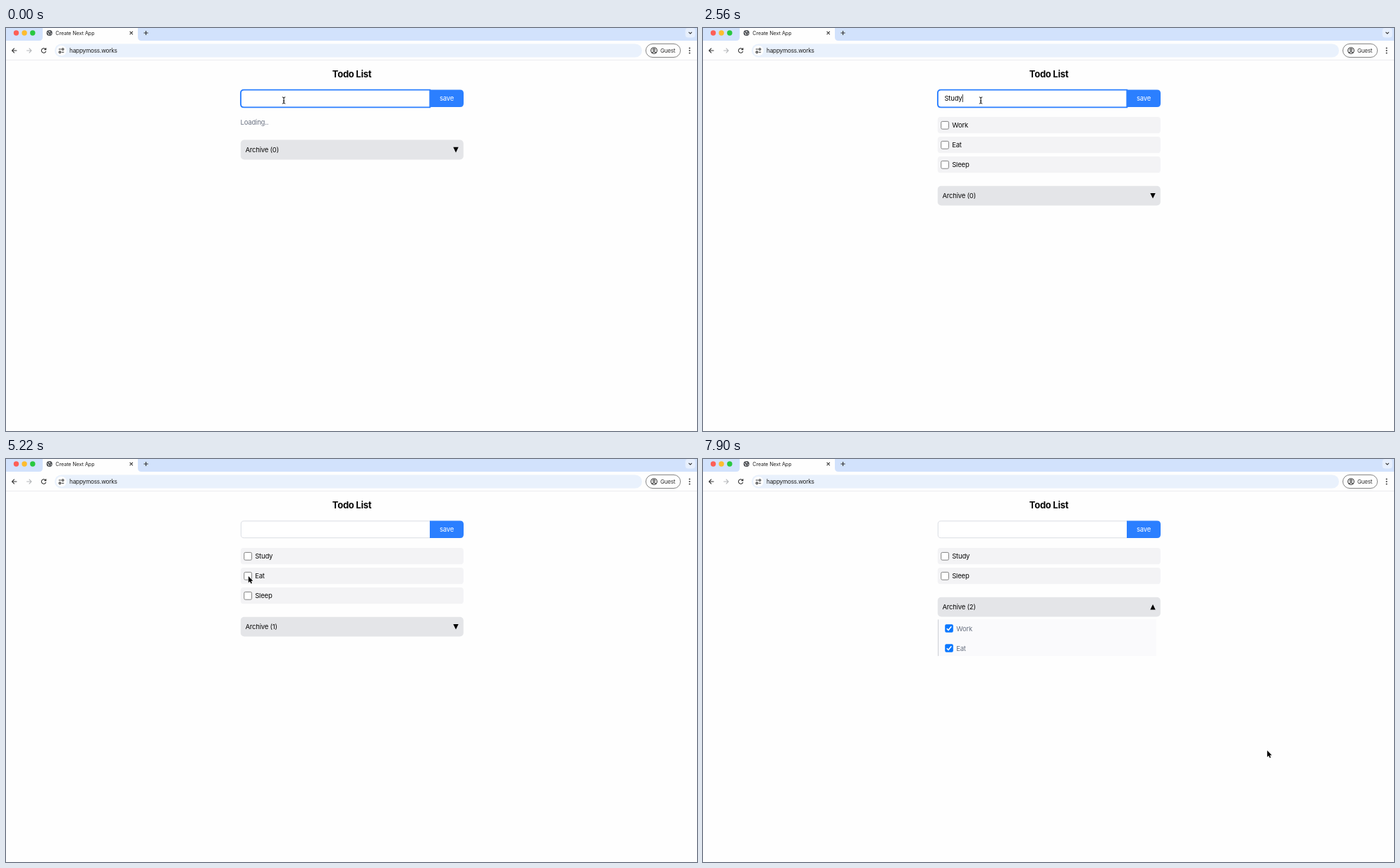
An HTML page that plays this animation: 980 by 571 pixels, repeating every 8000 ms.

```html
<!DOCTYPE html>
<html lang="en">
<head>
<meta charset="utf-8">
<title>Todo List</title>
<style>
html, body { margin: 0; width: 100%; height: 100%; overflow: hidden; background: #fefefe; }
svg { display: block; width: 980px; height: 571px; }
text { font: 9.5px Inter, Roboto, sans-serif; letter-spacing: -.02em; white-space: pre; fill: #0a0a0a; }
text.title { font-size: 13px; font-weight: 700; }
text.tab { font-size: 7.2px; letter-spacing: -.01em; fill: #1f1f1f; }
text.url { font-size: 8.3px; letter-spacing: -.03em; fill: #1f1f1f; }
text.guest { font-size: 8px; letter-spacing: -.03em; fill: #333; }
text.muted { fill: #6a7282; }
.icon { fill: none; stroke: #333; stroke-width: 1.1; }
</style>
</head>
<body>
<svg viewBox="0 0 980 571">
  <!-- tab strip -->
  <rect width="980" height="18" fill="#d2e2fc"/>
  <path d="M47 18q5 0 5-5V0H187V13q0 5 5 5Z" fill="#fefefe"/>
  <circle cx="14.5" cy="7" r="3.7" fill="#fe5f57"/>
  <circle cx="26.1" cy="7" r="3.7" fill="#febc2e"/>
  <circle cx="37.8" cy="7" r="3.7" fill="#28c840"/>
  <circle cx="61.6" cy="7" r="4.1" fill="#4a4d51"/>
  <path d="M58.6 6.4l2 1.2 .4 2.4M61 3.9l.4 1.6 1.8.3M63 8.6l1.6-.8" fill="none" stroke="#fff" stroke-width="1"/>
  <text class="tab" x="70.3" y="9.5">Create Next App</text>
  <path class="icon" d="M175.6 4.9l4.2 4.2m0-4.2l-4.2 4.2M195.4 7h6.2m-3.1-3.1v6.2"/>
  <rect x="963.5" y="0" width="14" height="13.5" rx="4" fill="#e7effd"/>
  <path class="icon" d="M968.3 5.8l2.2 2.2 2.2-2.2" stroke-width="1.2"/>
  <!-- toolbar -->
  <rect y="18" width="980" height="27" fill="#fefefe"/>
  <path d="M0 45.4H980" stroke="#e6e8ec" stroke-width=".8"/>
  <path class="icon" d="M15.4 32H8.6m3.3-3.3L8.6 32l3.3 3.3"/>
  <path class="icon" d="M29.2 32H36m-3.3-3.3L36 32l-3.3 3.3" style="stroke:#b4b6b9"/>
  <path class="icon" d="M56.2 30.3a3.2 3.2 0 1 0 .4 2.5M56.7 28.3v2.4h-2.4"/>
  <rect x="69" y="22.5" width="833" height="19" rx="9.5" fill="#e9f1fc"/>
  <circle cx="78.5" cy="32" r="7.3" fill="#fefefe"/>
  <g class="icon" stroke-width="1"><path d="M74.8 30h3.4M78.8 34.2h3.4"/><circle cx="80.6" cy="30" r="1.3"/><circle cx="76.4" cy="34.2" r="1.3"/></g>
  <text class="url" x="90" y="34.8">happymoss.works</text>
  <rect x="907.5" y="22.5" width="49" height="19" rx="9.5" fill="none" stroke="#777" stroke-width=".9"/>
  <g class="icon" stroke-width="1"><circle cx="919" cy="32" r="4.3"/><circle cx="919" cy="30.7" r="1.4"/><path d="M916 35q3-2.6 6 0"/></g>
  <text class="guest" x="928" y="34.8">Guest</text>
  <g fill="#333"><circle cx="969.5" cy="28.6" r="1"/><circle cx="969.5" cy="32" r="1"/><circle cx="969.5" cy="35.4" r="1"/></g>
  <!-- page -->
  <text class="title" x="490.5" y="69.6" text-anchor="middle">Todo List</text>
  <path d="M601 87.5h43q5 0 5 5v14.6q0 5-5 5h-43Z" fill="#2b7fff"/>
  <text x="615" y="103.4" style="fill:#fff">save</text>
  <g id="field"></g>
  <text id="typed" x="342.4" y="103.4"></text>
  <rect id="caret" y="94" width=".9" height="11" fill="#222"/>
  <g id="list"></g>
  <g id="beam"><path d="M-2.2-4.4Q0-4.4 0-2.8 0-4.4 2.2-4.4M0-3V4M-2.2 4.8Q0 4.8 0 3.4 0 4.8 2.2 4.8M-1.2 1h2.4" fill="none" stroke="#111" stroke-width="1"/></g>
  <path id="arrow" d="M0 0V9.2L2.1 7.3 3.6 10.6 5.1 9.9 3.7 6.8H6.5Z" fill="#000" stroke="#fff" stroke-width=".8" paint-order="stroke"/>
</svg>
<script>
const LOOP = 8000;
const el = id => document.getElementById(id);

const start = {
  text: '', caret: false, focus: true, loading: true, items: ['Eat', 'Sleep'],
  checked: '', done: [], open: false, turn: 0, beam: true, at: [394, 102.3]
};

// Each step changes part of the state from its time on.
const move = (x, y) => ({ at: [x, y] });
const type = text => ({ text, caret: true });
const steps = [
  [150, { loading: false }],
  [480, { caret: true }],
  [780, type('W')], [930, type('Wo')], [1080, type('Wor')], [1230, type('Work')],
  [1370, type('')],
  [1520, { loading: true }],
  [1670, { loading: false, items: ['Work', 'Eat', 'Sleep'] }],
  [2110, type('S')], [2260, type('St')], [2410, type('Stud')], [2560, type('Study')],
  [2860, type('')],
  [3010, { loading: true }],
  [3160, { loading: false, items: ['Study', 'Work', 'Eat', 'Sleep'] }],
  [3460, move(362, 104)],
  [3610, { ...move(324, 117), beam: false }],
  [3750, { ...move(319.5, 128), focus: false, caret: false }],
  [3900, move(322, 151)], [4040, move(332, 172)], [4190, move(339.5, 166.7)],
  [4490, { checked: 'Work' }],
  [4640, { loading: true }],
  [4780, { loading: false, items: ['Study', 'Eat', 'Sleep'], done: ['Work'] }],
  [4930, move(341, 167)], [5080, move(343, 166.5)], [5220, move(343.8, 166)],
  [5370, { checked: 'Eat' }],
  [5520, { loading: true }],
  [5670, { loading: false, items: ['Study', 'Sleep'], done: ['Work', 'Eat'] }],
  [5820, move(347, 172)], [5970, move(356, 188)], [6110, move(367, 206)], [6260, move(373.3, 215)],
  [6400, { open: true, turn: 140 }],
  [6550, { ...move(384, 258), turn: 180 }],
  [6700, move(396, 314.5)], [7000, move(394.7, 313.5)], [7150, move(395.5, 314)],
  [7600, move(455, 296)], [7750, move(680, 350)], [7900, move(800.2, 413)]
];

const label = (x, y, s, cls = '') => `<text class="${cls}" x="${x}" y="${y}">${s}</text>`;
const box = (x, y, on) => on
  ? `<rect x="${x}" y="${y}" width="11.6" height="11.6" rx="2" fill="#0a77ff"/>
     <path d="M${x + 2.6} ${y + 6}l2.2 2.4 4.3-5.4" fill="none" stroke="#fff" stroke-width="1.6"/>`
  : `<rect x="${x + .4}" y="${y + .4}" width="10.8" height="10.8" rx="1.8" fill="#fff" stroke="#767676" stroke-width=".9"/>`;

function drawList(s) {
  let out = s.loading
    ? label(332.5, 136.6, 'Loading..', 'muted')
    : s.items.map((name, i) => {
        const y = 126 + 28 * i;
        return `<rect x="332.8" y="${y}" width="316" height="23.2" rx="4" fill="#f3f3f5"/>`
          + box(337.3, y + 6, name === s.checked) + label(353.2, y + 15.4, name);
      }).join('');
  const top = s.loading ? 158.6 : 139.7 + 28 * s.items.length;
  out += `<rect x="332.8" y="${top}" width="316" height="27.8" rx="5" fill="#e4e5e8"/>`
    + label(339.4, top + 17.6, `Archive (${s.done.length})`)
    + `<path d="M-3.7-3.8H3.7L0 3.8Z" transform="translate(638 ${top + 14}) rotate(${s.turn})"/>`;
  if (s.open) {
    out += `<rect x="333" y="${top + 31.8}" width="310" height="51.6" fill="#fafafc"/>
      <rect x="333" y="${top + 31.8}" width="1.1" height="51.6" fill="#cfd2d8"/>`
      + s.done.map((name, i) => {
          const y = top + 38.5 + 28 * i;
          return box(343.2, y, true) + label(359.2, y + 9.4, name, 'muted');
        }).join('');
  }
  return out;
}

function draw(s) {
  el('field').innerHTML = s.focus
    ? '<path d="M337.5 87.6H601.3V112.4H337.5q-4.6 0-4.6-4.6V92.2q0-4.6 4.6-4.6Z" fill="#fff" stroke="#2b7fff" stroke-width="1.9"/>'
    : '<path d="M601 87.9H337.5q-4.2 0-4.2 4.2v15.4q0 4.2 4.2 4.2H601" fill="#fff" stroke="#d1d5dc" stroke-width=".8"/>';
  const typed = el('typed');
  typed.textContent = s.text;
  el('caret').setAttribute('x', s.text ? 342.4 + typed.getComputedTextLength() + .3 : 342.8);
  el('caret').style.display = s.caret ? '' : 'none';
  el('list').innerHTML = drawList(s);
  for (const id of ['beam', 'arrow']) {
    el(id).setAttribute('transform', `translate(${s.at})`);
    el(id).style.display = (id === 'beam') === s.beam ? '' : 'none';
  }
}

let shown = -1;
function tick(now) {
  const t = now % LOOP;
  const count = steps.filter(([time]) => time <= t).length;
  if (count !== shown) {
    shown = count;
    draw(Object.assign({}, start, ...steps.slice(0, count).map(([, change]) => change)));
  }
  requestAnimationFrame(tick);
}
const begin = performance.now();
requestAnimationFrame(function first() { tick(performance.now() - begin); });
</script>
</body>
</html>
```
